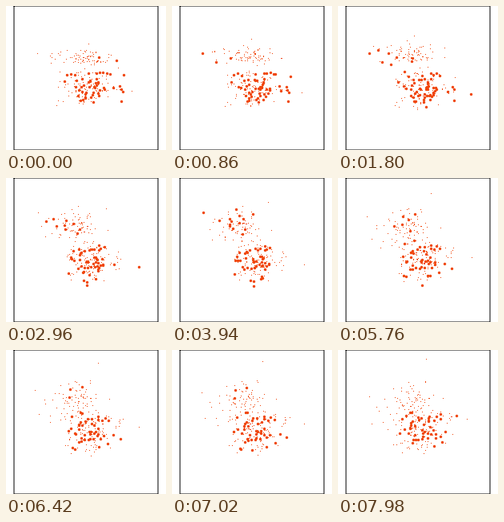
A matplotlib script for the animation above (8000 ms loop, 200 px wide and 180 px high).

```python
import numpy as np
import matplotlib.pyplot as plt
from matplotlib.animation import FuncAnimation

W, H = 200, 180
MID = np.array([100, 90])
SLICE = 12            # points closer than this to the plane are drawn large
TURN, LAST = 78, 171  # steps at which the tour reaches its target planes
PX = 72 / 100         # one pixel in points
ORANGE = "#f0450b"
rng = np.random.default_rng(12)

# Tour planes in four dimensions: one row for x, one for y.
PLANES = [np.array(p) for p in (
    [[1, 0, 0, 0], [0, 1, 0, 0]],
    [[.7, 0, .714, 0], [0, .7, 0, .714]],
    [[.85, -.1, .2, .33], [-.35, .3, 0, .9]],
)]


def bases(step):
    """Orthonormal projection plane (4x2) and its complement (4x2)."""
    if step < TURN:
        a, b, f = PLANES[0], PLANES[1], step / TURN
    else:
        a, b, f = PLANES[1], PLANES[2], (step - TURN) / (LAST - TURN)
    u, _, vt = np.linalg.svd((a + (b - a) * f).T)
    return u[:, :2] @ vt, u[:, 2:]


def cluster(n, mean, sd):
    """Gaussian cluster without its far tails."""
    g = rng.normal(size=(n * 2, 4))
    g = g[(np.abs(g) < 2.3).all(axis=1)][:n]
    return np.array(mean) + g * np.array(sd)


OUTLIERS = [
    (57, 17, 34, 12.5),    # right
    (-43, -25, -42, -42),  # upper left
    (-61, -30, -13, -9),   # left
    (3, -42, -20, -34),    # top of the upper cluster
    (40, -12, -10, -68),   # rises to the top late
]

DATA = np.vstack([
    cluster(80, (-3, -24, -22, -19), (19, 4.5, 11, 13)),
    cluster(145, (4, 11, 6, 8), (19, 11, 12, 11)),
    OUTLIERS,
])


def step_at(tick):
    """Each 140 ms holds three steps, lasting 20, 100 and 20 ms."""
    k, r = divmod(tick, 7)
    return 3 * k + (r > 0) + (r > 5)


fig = plt.figure(figsize=(W / 100, H / 100), dpi=100, facecolor="white")
ax = fig.add_axes([0, 0, 1, 1])
ax.set_xlim(0, W)
ax.set_ylim(H, 0)
ax.axis("off")
ax.plot([10, 190, 190, 10, 10], [0, 0, 180, 180, 0],
        color="black", lw=PX, snap=False)
small, = ax.plot([], [], ",", color=ORANGE)
large, = ax.plot([], [], "o", color=ORANGE, ms=3.4 * PX, mew=0)


def draw(tick):
    plane, rest = bases(step_at(tick))
    pos = DATA @ plane + MID
    near = np.hypot(*(DATA @ rest).T) < SLICE
    small.set_data(*pos[~near].T)
    large.set_data(*pos[near].T)
    return small, large


anim = FuncAnimation(fig, draw, frames=400, interval=20, repeat=True,
                     repeat_delay=0, blit=False)
plt.show()
```
